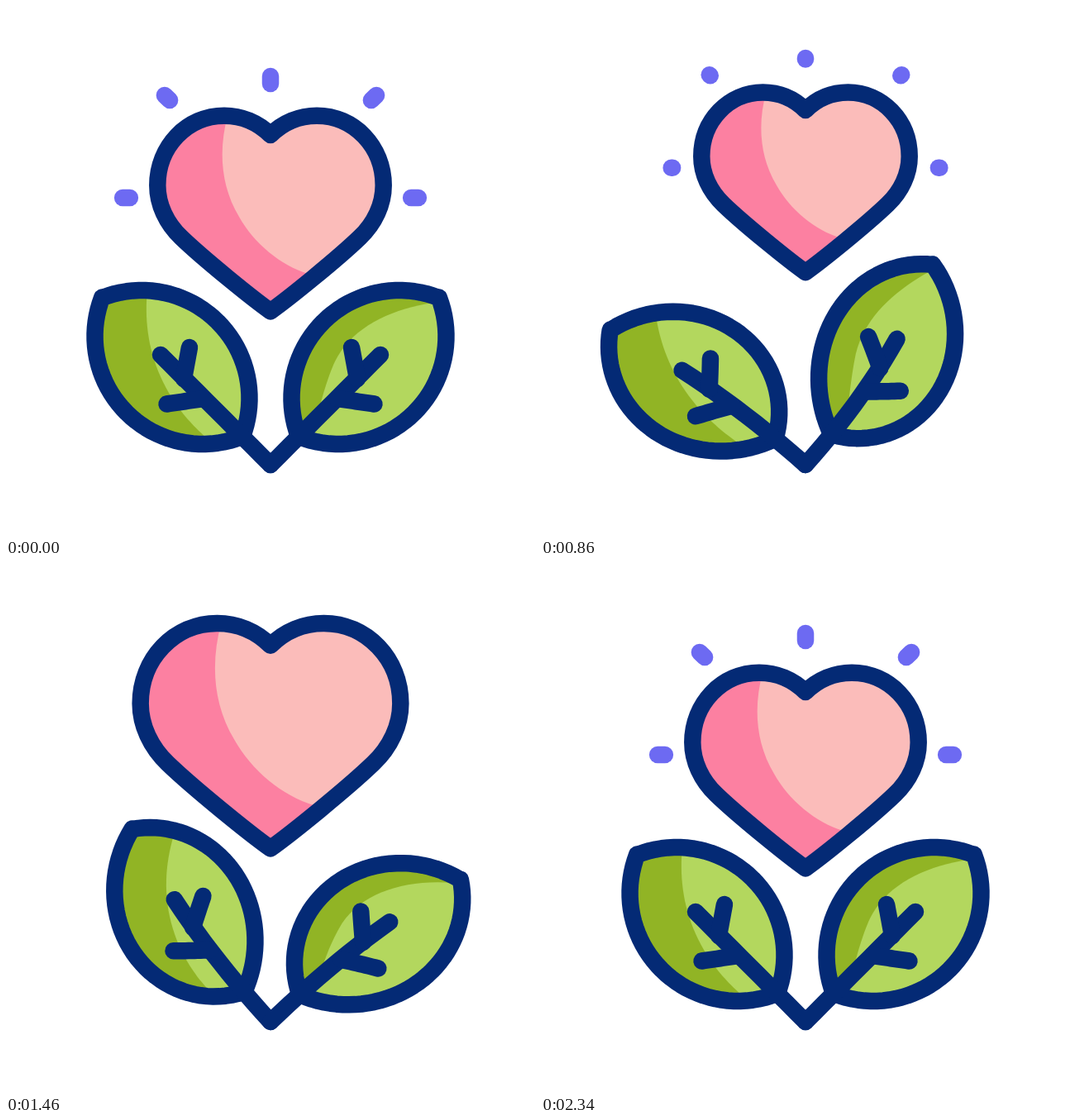
Animation, 640 px wide and 640 px high, one loop 2400 ms. Source, as an HTML page with a canvas:

```html
<!DOCTYPE html>
<html lang="en">
<head>
<meta charset="utf-8">
<title>Heart flower</title>
<style>
html, body { margin: 0; width: 100%; height: 100%; overflow: hidden; background: #fff; }
canvas { display: block; width: 640px; height: 640px; }
</style>
</head>
<body>
<canvas id="stage" width="640" height="640"></canvas>
<script>
const canvas = document.getElementById('stage');
const ctx = canvas.getContext('2d');
const dpr = window.devicePixelRatio || 1;
canvas.width = canvas.height = 640 * dpr;

const LOOP = 2400, STEP = 20, LINE = 20.5, RAD = Math.PI / 180;
const NAVY = '#042a75', RAY = '#6d6af2';
const PINK = '#fc80a1', BLUSH = '#fbbcba';
const MOSS = '#91b425', LIME = '#b3d75e';

// Keys: [time, value]
const LIFT = [[200, 0], [1192, 51], [2187, 0]];
const BEAT = [[200, 1], [600, 1.09], [990, 0.86], [1400, 1.155], [2030, 1]];
const LEFT = [[200, 0], [800, -11], [1330, 13], [1860, -9.8], [2225, 0]];
const RIGHT = [[200, 0], [740, -17.5], [1260, 17.3], [1780, -11], [2160, 0]];

const clamp = u => Math.max(0, Math.min(1, u));
const ease = u => { u = clamp(u); return u * u * (3 - 2 * u); };

function track(keys, t) {
  if (t <= keys[0][0]) return keys[0][1];
  for (let i = 1; i < keys.length; i++) {
    const [t0, a] = keys[i - 1], [t1, b] = keys[i];
    if (t <= t1) return a + (b - a) * ease((t - t0) / (t1 - t0));
  }
  return keys[keys.length - 1][1];
}

// Point lists, dense enough to be bent smoothly.
function sample(n, fn) {
  return Array.from({ length: n + 1 }, (_, i) => fn(i / n));
}

function arc(cx, cy, r, from, to) {
  return sample(40, u => {
    const a = (from + (to - from) * u) * RAD;
    return [cx + r * Math.cos(a), cy + r * Math.sin(a)];
  });
}

function line(a, b) {
  return sample(12, u => [a[0] + (b[0] - a[0]) * u, a[1] + (b[1] - a[1]) * u]);
}

function cubic(a, b, c, d) {
  return sample(20, u => [0, 1].map(k => {
    const v = 1 - u;
    return v * v * v * a[k] + 3 * v * v * u * b[k] + 3 * v * u * u * c[k] + u * u * u * d[k];
  }));
}

// Heart coordinates are relative to (320, 251).
const heart = new Path2D('M0 -95C-15 -110 -35 -118.3 -56 -118.3C-101 -118.3 -136.7 -81 -136.7 -34' +
  'C-136.7 -11 -126 12 -108 29C-81 55 -21 103.5 0 118.3C21 103.5 81 55 108 29' +
  'C126 12 136.7 -11 136.7 -34C136.7 -81 101 -118.3 56 -118.3C35 -118.3 15 -110 0 -95Z');
const heartLight = new Path2D('M-50 -125C-63 -82 -62 -36 -38 4C-20 36 12 63 46 73L70 80L200 80V-125Z');

// The left leaf; the right one is its mirror image.
const leafEdge = [
  ...arc(164, 474.5, 130.5, -111.2, 21.1),
  ...arc(238, 399.5, 130.5, 68.8, 201.1)
];
const veins = [
  line([320, 555], [187, 422]),
  line([222, 413], [215, 451]),
  line([194.5, 481.5], [239, 475])
];
const leftLight = [
  ...cubic([172, 335], [166, 380], [172, 425], [197, 468]),
  ...cubic([197, 468], [210, 490], [226, 509], [249, 528]),
  [330, 528], [330, 335]
];
const rightLight = [
  ...cubic([106, 357], [165, 362], [220, 385], [242, 430]),
  ...cubic([242, 430], [252, 452], [260, 480], [270, 524]),
  [100, 545]
];

// The leaf swings about the stem foot, more and later towards its tip.
function bender(keys, t, flip) {
  return ([x, y]) => {
    const dx = x - 320, dy = y - 555, k = Math.hypot(dx, dy) / 287;
    const a = flip * RAD * track(keys, t + 60 * (1 - k)) * (0.42 + 0.58 * k);
    const c = Math.cos(a), s = Math.sin(a);
    return [320 + flip * (dx * c - dy * s), 555 + dx * s + dy * c];
  };
}

function trace(points, bend) {
  const path = new Path2D();
  for (const p of points) path.lineTo(...bend(p));
  return path;
}

// Ray centre and direction, relative to the heart centre.
const D = Math.SQRT1_2;
const rays = [
  [0, -161.5, 0, -1],
  [-125, -140, -D, -D], [125, -140, D, -D],
  [-174.5, -19, -1, 0], [174.5, -19, 1, 0]
];
const HALF = 4.4;

function grow(u) {
  const mid = 1.5 * (1 - u);
  return [mid - HALF * u, mid + HALF * u];
}

function fly(u) {
  return [-HALF + 28.5 * ease(u), HALF + 19.7 * ease(u / 0.75)];
}

function raySpan(t) {
  if (t <= 200 || t >= 1900) return grow(1);
  if (t < 500) return fly((t - 200) / 300);
  if (t < 840) return null;
  if (t < 950) return grow((t - 840) / 110);
  if (t < 1200) return fly((t - 950) / 250);
  return t > 1800 ? grow((t - 1800) / 100) : null;
}

function shade(shape, light, dark, pale) {
  ctx.save();
  ctx.clip(shape);
  ctx.fillStyle = dark;
  ctx.fill(shape);
  ctx.fillStyle = pale;
  ctx.fill(light);
  ctx.restore();
}

function drawRays(s, t) {
  const span = raySpan(t);
  if (!span) return;
  ctx.strokeStyle = RAY;
  for (const [x, y, dx, dy] of rays) {
    ctx.beginPath();
    ctx.moveTo((x + dx * span[0]) * s, (y + dy * span[0]) * s);
    ctx.lineTo((x + dx * span[1]) * s, (y + dy * span[1]) * s);
    ctx.stroke();
  }
}

function drawHeart(t) {
  const s = track(BEAT, t);
  ctx.save();
  ctx.translate(320, 251 - track(LIFT, t));
  drawRays(s, t);
  ctx.scale(s, s);
  shade(heart, heartLight, PINK, BLUSH);
  ctx.strokeStyle = NAVY;
  ctx.lineWidth = LINE / s;
  ctx.stroke(heart);
  ctx.restore();
}

function drawLeaf(bend, light) {
  const edge = trace(leafEdge, bend);
  edge.closePath();
  shade(edge, trace(light, bend), MOSS, LIME);
  ctx.strokeStyle = NAVY;
  ctx.stroke(edge);
  for (const vein of veins) ctx.stroke(trace(vein, bend));
}

function draw(t) {
  ctx.setTransform(dpr, 0, 0, dpr, 0, 0);
  ctx.fillStyle = '#fff';
  ctx.fillRect(0, 0, 640, 640);
  ctx.lineCap = ctx.lineJoin = 'round';
  ctx.lineWidth = LINE;
  drawHeart(t);
  drawLeaf(bender(LEFT, t, 1), leftLight);
  drawLeaf(bender(RIGHT, t, -1), rightLight);
}

const begin = performance.now();
function tick() {
  const t = Math.max(0, performance.now() - begin) % LOOP;
  draw(Math.floor(t / STEP) * STEP);
  requestAnimationFrame(tick);
}
draw(0);
requestAnimationFrame(tick);
</script>
</body>
</html>
```
